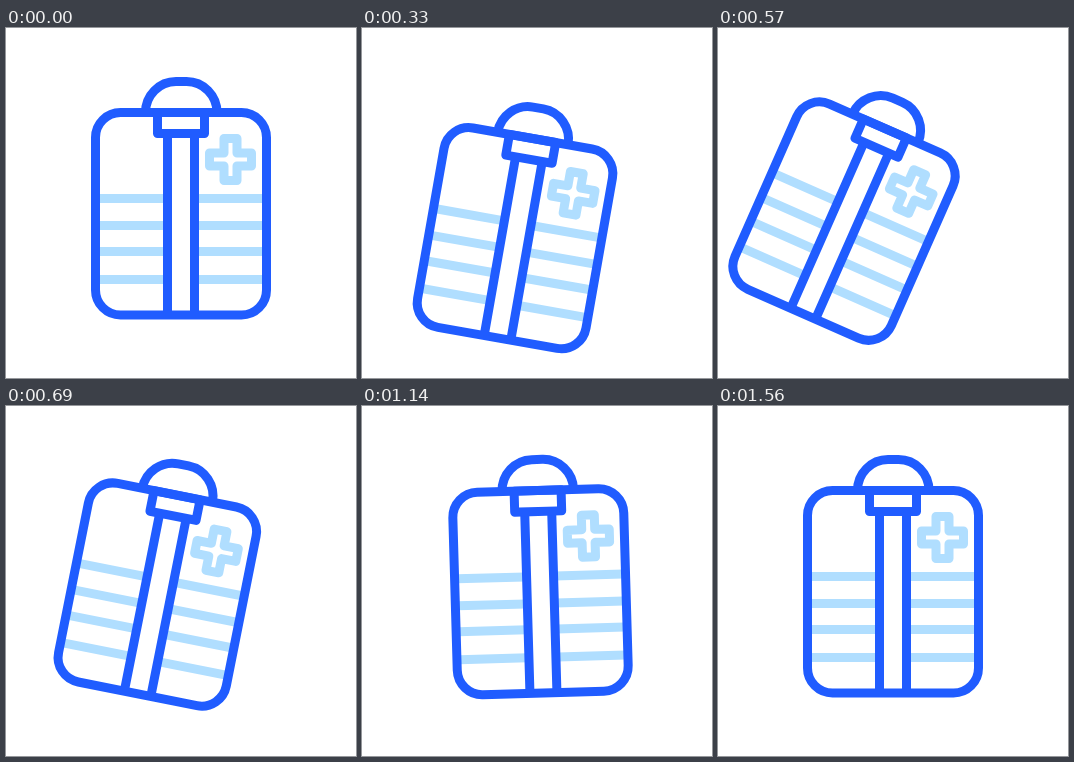
These frames come from a looping animation (350 px wide and 350 px high, 1.67 s). An HTML page:

```html
<!DOCTYPE html>
<html lang="en">
<head>
<meta charset="utf-8">
<title>Swinging first-aid bag</title>
<style>
  html, body { margin: 0; width: 100%; height: 100%; overflow: hidden; background: #fff; }
  svg { display: block; width: 100vw; height: 100vh; }
  g { fill: none; stroke-width: 9; stroke-linejoin: round; }
  .light { stroke: #b0deff; }
  .dark { stroke: #205cff; }
</style>
</head>
<body>
<svg viewBox="0 0 350 350">
  <g id="bag">
    <g class="light">
      <path d="M92 170.5H160M92 197.5H160M92 223.5H160M92 251.5H160
               M190 170.5H258M190 197.5H258M190 223.5H258M190 251.5H258"/>
      <path d="M218 110.5h13v14.5h14.5v13h-14.5v14.5h-13v-14.5h-14.5v-13h14.5z"/>
    </g>
    <g class="dark">
      <path d="M139.5 84.5A30.5 31 0 0 1 170 53.5H180.5A30.5 31 0 0 1 211 84.5"/>
      <rect x="89.5" y="84.5" width="171" height="202.5" rx="25"/>
      <path d="M161.5 105V287M188.5 105V287"/>
      <rect x="151.5" y="84.5" width="47" height="21"/>
    </g>
  </g>
</svg>
<script>
  const LOOP = 1670, STEP = 30, END = 1560;
  const bag = document.getElementById('bag');

  // Keys are [time in ms, value]
  const angle = [[0, 0], [165, -10], [480, 27.2], [940, -9.7], [1300, 4], [END, 0]];
  const shiftX = [[0, 0], [165, -2.5], [450, 0]];
  const shiftY = [[0, 0], [295, 26.5], [420, 25.3], [885, -7], [1140, 0]];

  // Sine easing between neighbouring keys
  function valueAt(keys, t) {
    const i = keys.findIndex(([time]) => time > t);
    if (i < 0) return keys[keys.length - 1][1];
    const [t0, a] = keys[i - 1], [t1, b] = keys[i];
    return a + (b - a) * (1 - Math.cos(Math.PI * (t - t0) / (t1 - t0))) / 2;
  }

  function draw(now) {
    const t = Math.min(Math.floor((now % LOOP) / STEP) * STEP, END);
    bag.setAttribute('transform',
      `translate(${valueAt(shiftX, t)} ${valueAt(shiftY, t)}) rotate(${valueAt(angle, t)} 175 64.5)`);
  }

  const start = performance.now();
  function tick() {
    draw(performance.now() - start);
    requestAnimationFrame(tick);
  }
  tick();
</script>
</body>
</html>
```
